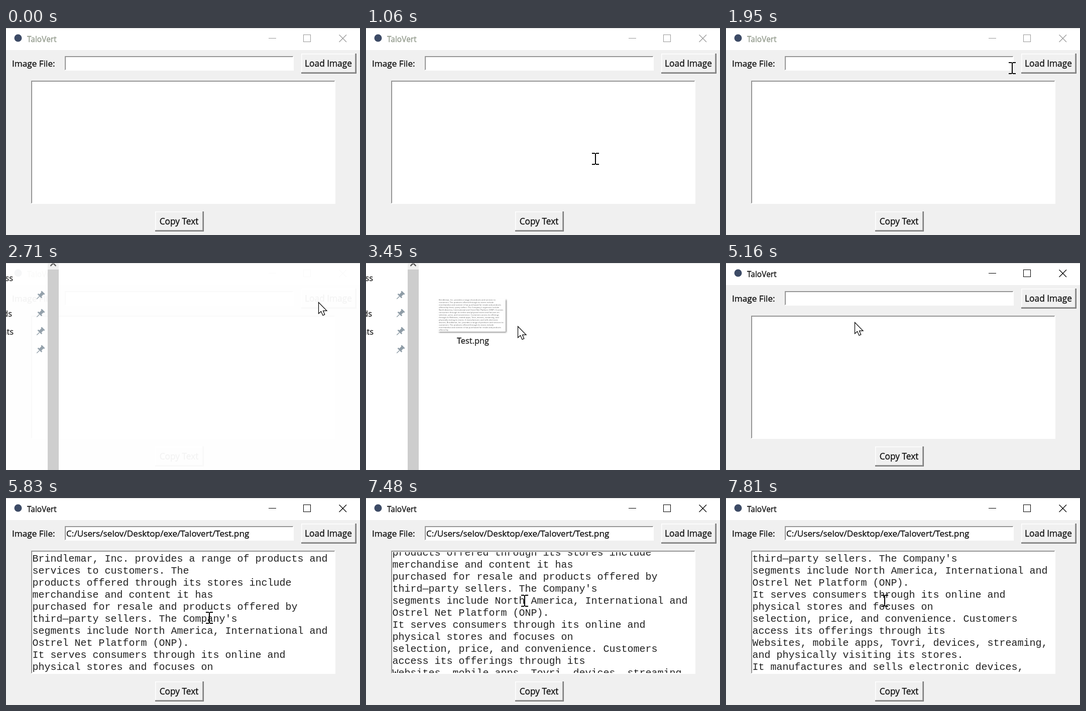
Write an HTML page with a canvas that moves like this. It is 705 px wide and 413 px high and loops after 8000 ms.

```html
<!DOCTYPE html>
<html lang="en">
<head>
<meta charset="utf-8">
<title>TaloVert</title>
<style>
  html, body { margin: 0; width: 705px; height: 413px; overflow: hidden; background: #f0f0f0; }
  canvas { display: block; }
</style>
</head>
<body>
<canvas id="stage" width="705" height="413"></canvas>
<script>
const ctx = document.getElementById('stage').getContext('2d');
const W = 705, H = 413, LOOP = 8000;
const UI = '"Open Sans", "Noto Sans", sans-serif';
const MONO = '"Liberation Mono", "DejaVu Sans Mono", monospace';
const PATH = 'C:/Users/selov/Desktop/exe/Talovert/Test.png';
const LINES = [
  'Brindlemar, Inc. provides a range of products and',
  'services to customers. The',
  'products offered through its stores include',
  'merchandise and content it has',
  'purchased for resale and products offered by',
  'third\u2014party sellers. The Company\'s',
  'segments include North America, International and',
  'Ostrel Net Platform (ONP).',
  'It serves consumers through its online and',
  'physical stores and focuses on',
  'selection, price, and convenience. Customers',
  'access its offerings through its',
  'Websites, mobile apps, Tovri, devices, streaming,',
  'and physically visiting its stores.',
  'It manufactures and sells electronic devices,'
];

const ENTRY = [117, 56, 456, 29];
const AREA = [50, 105, 606, 246];
const LOAD = [588, 51, 110, 40];
const COPY = [297, 366, 97, 40];

// Pointer moves: start, end, steps, points evenly spread over the steps
const MOVES = [
  [720, 1470, 12, [[550, 353], [525, 325], [440, 245], [370, 192], [346, 179]]],
  [1670, 2160, 8, [[368, 172], [432, 148], [515, 119], [548, 82],
                   [568, 79], [592, 79], [612, 79], [622, 78]]],
  [3100, 3800, 11, [[600, 86], [470, 112], [345, 130], [259, 122], [232, 107], [222, 102]]],
  [5160, 5570, 7, [[256, 118], [333, 175], [387, 222], [403, 238]]],
  [6690, 6820, 3, [[382, 229], [340, 212], [314, 204]]]
];
const CLICKS = [[2230, 2400], [4060, 4200], [4270, 4400]];

const within = (t, a, b) => t >= a && t < b;
const inside = (p, [x, y, w, h]) => p[0] >= x && p[0] < x + w && p[1] >= y && p[1] < y + h;

// Finished steps of a stepped change, from 0 to n
function steps(t, start, end, n) {
  if (t < start) return 0;
  return Math.min(n, 1 + Math.floor((t - start) / (end - start) * (n - 1) + 0.001));
}

function pointer(t) {
  let pos = null;
  for (const [start, end, n, pts] of MOVES) {
    const k = steps(t, start, end, n);
    if (!k) break;
    const u = (k - 1) / (n - 1) * (pts.length - 1);
    const i = Math.min(pts.length - 2, Math.floor(u));
    pos = [0, 1].map(a => pts[i][a] + (pts[i + 1][a] - pts[i][a]) * (u - i));
  }
  return pos;
}

function rect(x, y, w, h, color) {
  ctx.fillStyle = color;
  ctx.fillRect(x, y, w, h);
}

function circle(x, y, r, color) {
  ctx.fillStyle = color;
  ctx.beginPath();
  ctx.arc(x, y, r, 0, 7);
  ctx.fill();
}

function text(str, x, y, size, color = '#111', align = 'left', family = UI) {
  ctx.font = size + 'px ' + family;
  ctx.textAlign = align;
  ctx.fillStyle = color;
  ctx.fillText(str, x, y);
}

// Interface labels are a little heavier than the plain weight
function label(str, x, y, size, color, align) {
  text(str, x, y, size, color, align);
  ctx.strokeStyle = ctx.fillStyle;
  ctx.lineWidth = 0.35;
  ctx.strokeText(str, x, y);
}

function trace(pts, closed) {
  ctx.beginPath();
  pts.forEach(p => ctx.lineTo(...p));
  if (closed) ctx.closePath();
}

function stroke(pts, color, width) {
  ctx.strokeStyle = color;
  ctx.lineWidth = width;
  trace(pts);
  ctx.stroke();
}

function field([x, y, w, h]) {
  rect(x, y, w, h, '#fff');
  rect(x, y, w - 1, 1, '#a0a0a0');
  rect(x, y, 1, h - 1, '#a0a0a0');
  rect(x + 1, y + 1, w - 3, 1, '#8a8a8a');
  rect(x + 1, y + 1, 1, h - 3, '#8a8a8a');
}

function button([x, y, w, h], name, down) {
  const [light, dark, mid] = down ? ['#777', '#fff', '#e3e3e3'] : ['#fff', '#747474', '#a0a0a0'];
  rect(x, y, w, h, dark);
  rect(x, y, w - 1.5, h - 1.5, mid);
  rect(x, y, w - 3, h - 3, light);
  rect(x + 1.5, y + 1.5, w - 4.5, h - 4.5, '#f0f0f0');
  const d = down ? 1.5 : 0;
  label(name, x + w / 2 - 1 + d, y + 25.5 + d, 17.3, '#111', 'center');
}

function appWindow(t) {
  const active = t >= 2230 && !within(t, 2510, 4620);
  const ink = active ? '#000' : '#999';
  rect(0, 0, W, H, '#f0f0f0');
  rect(0, 0, W, 44, '#fff');
  rect(0, 0, W, 1, '#d9d9d9');
  circle(24, 20, 7.5, '#3d4b66');
  label('TaloVert', 42, 27.5, 15.5, active ? '#111' : '#929a8c');
  rect(523, 20, 15, 1, ink);
  ctx.strokeStyle = ink;
  ctx.lineWidth = 1;
  ctx.strokeRect(592.5, 13.5, 14, 14);
  stroke([[663.5, 13.5], [678, 28]], ink, 1.2);
  stroke([[678, 13.5], [663.5, 28]], ink, 1.2);

  label('Image File:', 12, 77, 17.2);
  field(ENTRY);
  button(LOAD, 'Load Image', within(t, 2230, 2370));
  field(AREA);
  button(COPY, 'Copy Text', false);
  if (t >= 5830) result(t);
}

function result(t) {
  label(PATH, 120, 77, 17.2);
  const scroll = t >= 7810 ? 120 : t >= 7480 ? 60 : 0;
  ctx.save();
  ctx.beginPath();
  ctx.rect(52, 108, 602, 241);
  ctx.clip();
  LINES.forEach((line, i) => text(line, 52.5, 127 + i * 24 - scroll, 20, '#222', 'left', MONO));
  ctx.restore();
}

function pin(x, y) {
  ctx.save();
  ctx.translate(x, y);
  ctx.rotate(Math.PI / 4);
  rect(-4.5, -9, 9, 2.5, '#8e9ca6');
  rect(-3, -7, 6, 7, '#8e9ca6');
  rect(-5.5, -0.5, 11, 2.5, '#8e9ca6');
  rect(-0.7, 2, 1.4, 7.5, '#8e9ca6');
  ctx.restore();
}

function thumbnail() {
  ctx.save();
  ctx.shadowColor = 'rgba(0,0,0,.5)';
  ctx.shadowBlur = 3;
  ctx.shadowOffsetX = ctx.shadowOffsetY = 1.5;
  rect(143, 71, 135, 66, '#fff');
  ctx.restore();
  const words = LINES.concat(LINES).join(' ').split(' ');
  ctx.font = '4px ' + UI;
  let next = 0;
  for (let row = 0; row < 13; row++) {
    const room = row < 12 ? 130 : 42;
    let line = words[next++];
    while (ctx.measureText(line + ' ' + words[next]).width < room) line += ' ' + words[next++];
    text(line, 145, 74.5 + row * 5.05, 4, '#666');
  }
}

function dialog(t, pos) {
  rect(0, 0, W, H, '#fff');
  label('access', 14, 36, 16.3, '#222', 'right');
  label('Downloads', 12, 107, 16.3, '#222', 'right');
  label('Documents', 15, 143, 16.3, '#222', 'right');
  for (let i = 0; i < 4; i++) pin(68, 65 + i * 36);
  rect(83, 0, 22, H, '#f0f0f0');
  rect(83, 13, 22, H - 13, '#cdcdcd');
  stroke([[88.5, 6], [94, 0.5], [99.5, 6]], '#505050', 2.4);
  if (t >= 2770) {
    if (t >= 4060) {
      rect(133, 0, 158, 170, '#99d1ff');
      rect(134.5, 1, 155, 167.5, '#cce8ff');
    } else if (t > 3100 && pos[0] < 291) {
      rect(134, 0, 157, 170, '#e5f3ff');
    }
    thumbnail();
    label('Test.png', 213, 161, 16.4, '#222', 'center');
  }
  rect(0, 0, W, 1, '#dcdcdc');
}

function arrow([x, y]) {
  ctx.save();
  ctx.translate(x + 0.5, y + 0.5);
  trace([[0, 0], [0, 22.5], [5, 18], [8.5, 26], [12.3, 24.4], [9, 16.8], [16.5, 16.8]], true);
  ctx.fillStyle = '#fff';
  ctx.fill();
  ctx.strokeStyle = '#000';
  ctx.lineWidth = 1.2;
  ctx.stroke();
  ctx.restore();
}

function beam([px, py]) {
  const x = Math.round(px + 2), y = Math.round(py + 1);
  rect(x - 1, y - 11, 2, 22, '#000');
  for (const side of [y - 12, y + 10]) {
    rect(x - 7, side, 6, 2, '#000');
    rect(x + 1, side, 6, 2, '#000');
  }
}

function draw(t) {
  const pos = pointer(t);
  appWindow(t);
  const shown = t < 4550
    ? [0, 0.35, 0.7, 0.95, 1][steps(t, 2510, 2770, 4)]
    : [1, 0.6, 0.2, 0][steps(t, 4550, 4690, 3)];
  if (shown) {
    ctx.globalAlpha = shown;
    dialog(t, pos);
    ctx.globalAlpha = 1;
  }
  if (!pos) return;
  if (CLICKS.some(([a, b]) => within(t, a, b))) circle(pos[0], pos[1], 18, 'rgba(250,232,30,.72)');
  const typing = !within(t, 2510, 5830) && (inside(pos, ENTRY) || inside(pos, AREA));
  (typing ? beam : arrow)(pos);
}

function tick() {
  draw(performance.now() % LOOP);
  requestAnimationFrame(tick);
}
tick();
</script>
</body>
</html>
```
